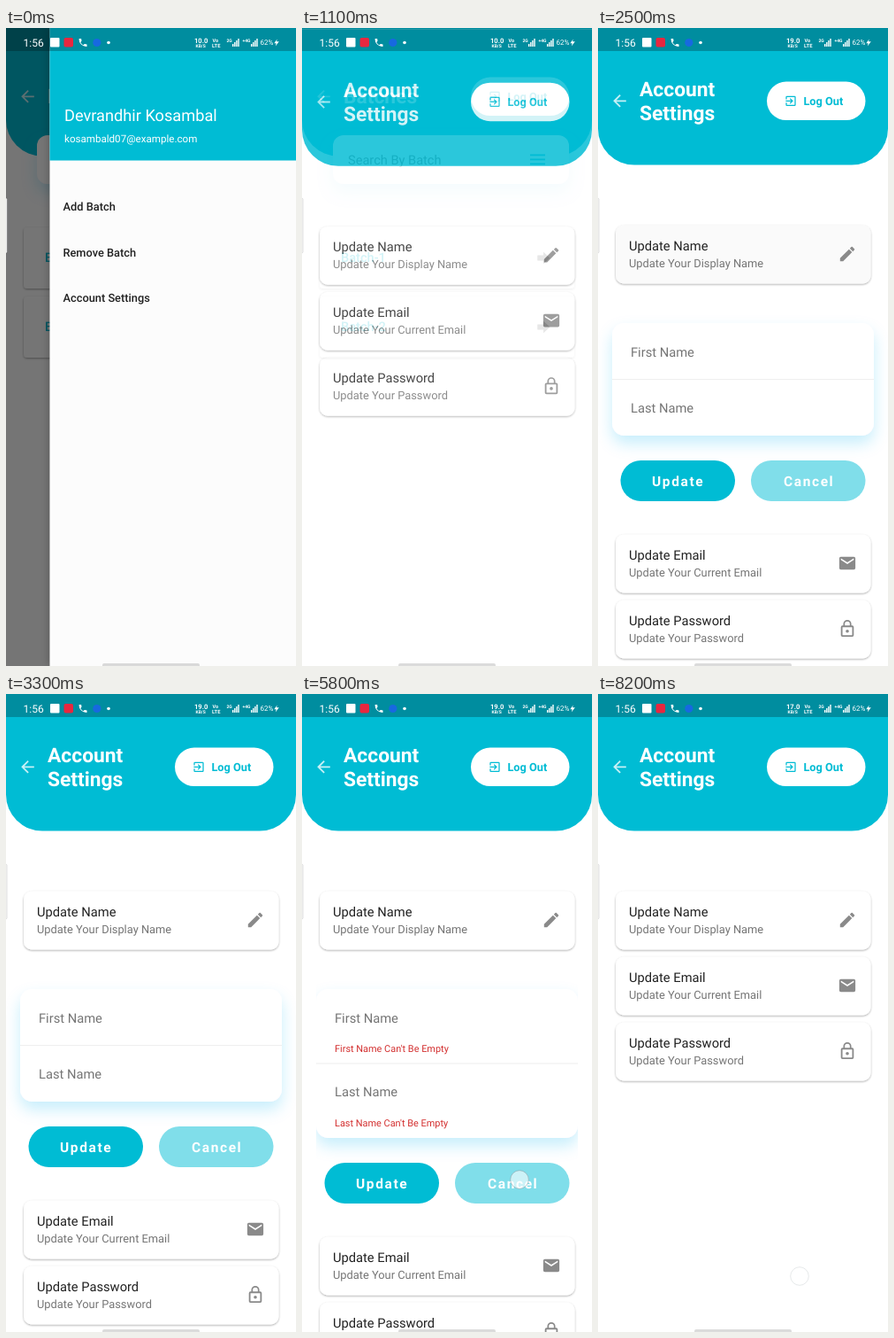
Recreate the animation shown at these times as an HTML page. Size 328 px wide and 720 px high, loop 8300 ms.

```html
<!DOCTYPE html>
<html lang="en">
<head>
<meta charset="utf-8">
<title>Account settings</title>
<style>
html, body { margin: 0; width: 100%; height: 100%; overflow: hidden; background: #fff; }
svg { display: block; width: 100%; height: 100%; font-family: Roboto, sans-serif; text-rendering: geometricPrecision; }
text { white-space: pre; }
</style>
</head>
<body>
<svg id="stage" viewBox="0 0 328 720"></svg>
<script>
const LOOP = 8300, CYAN = '#00bcd4', DARK = '#212121', GREY = '#757575';
const CARD_Y = 222.5, CARD_H = 66, PITCH = 74, FORM_H = 275, ERR_H = 20.5;

const ICONS = {
  back: 'M20 11H7.83l5.59-5.59L12 4l-8 8 8 8 1.41-1.41L7.83 13H20z',
  exit: 'M10.1 15.6L11.5 17l5-5-5-5-1.4 1.4L12.7 11H3v2h9.7zM19 3H5a2 2 0 0 0-2 2v4h2V5h14v14H5v-4H3v4a2 2 0 0 0 2 2h14a2 2 0 0 0 2-2V5a2 2 0 0 0-2-2z',
  edit: 'M3 17.25V21h3.75L17.8 9.94l-3.75-3.75zM20.7 7.04a1 1 0 0 0 0-1.41l-2.34-2.34a1 1 0 0 0-1.41 0l-1.83 1.83 3.75 3.75z',
  mail: 'M20 4H4a2 2 0 0 0-2 2v12a2 2 0 0 0 2 2h16a2 2 0 0 0 2-2V6a2 2 0 0 0-2-2zm0 4l-8 5-8-5V6l8 5 8-5z',
  lock: 'M12 17a2 2 0 0 0 0-4 2 2 0 0 0 0 4zm6-9h-1V6A5 5 0 0 0 7 6v2H6a2 2 0 0 0-2 2v10a2 2 0 0 0 2 2h12a2 2 0 0 0 2-2V10a2 2 0 0 0-2-2zM8.9 6a3.1 3.1 0 0 1 6.2 0v2H8.9zM18 20H6V10h12z',
  phone: 'M6.6 10.8c1.4 2.8 3.8 5.1 6.6 6.6l2.2-2.2c.3-.3.7-.4 1-.2 1.1.4 2.3.6 3.6.6a1 1 0 0 1 1 1V20a1 1 0 0 1-1 1A17 17 0 0 1 3 4a1 1 0 0 1 1-1h3.5a1 1 0 0 1 1 1c0 1.3.2 2.5.6 3.6.1.4 0 .7-.3 1z',
  arrow: 'M3 8h9V3l10 9-10 9v-5H3z',
  bolt: 'M14 2L5 14h6l-2 8 10-13h-7z'
};

// y is the middle of the capitals
const text = (x, y, size, str, fill, weight = 400, attrs = '') =>
  `<text x="${x}" y="${y + size * .355}" font-size="${size}" font-weight="${weight}" fill="${fill}" ${attrs}>${str}</text>`;
const rect = (x, y, w, h, r, fill, attrs = '') =>
  `<rect x="${x}" y="${y}" width="${w}" height="${h}" rx="${r}" fill="${fill}" ${attrs}/>`;
const icon = (name, cx, cy, size, fill) =>
  `<path d="${ICONS[name]}" fill="${fill}" fill-rule="evenodd" transform="translate(${cx - size / 2} ${cy - size / 2}) scale(${size / 24})"/>`;

function header(bottom, lines) {
  const r = 41, mid = bottom / 2 + 5;
  const top = mid - (lines.length - 1) * 13.5;
  return `<path d="M0 0H328V${bottom - r}a${r} ${r} 0 0 1-${r} ${r}H${r}a${r} ${r} 0 0 1-${r}-${r}z" fill="${CYAN}"/>` +
    icon('back', 24.5, mid, 21.9, 'rgba(255,255,255,.78)') +
    lines.map((s, i) => text(47, top + i * 27, 22.8, s, '#fff', 700)).join('') +
    rect(191, mid - 21.8, 111.5, 43.6, 21.8, '#fff') +
    icon('exit', 218, mid, 15, CYAN) + text(232.4, mid, 12.75, 'Log Out', CYAN, 700);
}

const batch = (y, name) =>
  rect(20, y, 288, 69, 4, '#fff', 'filter="url(#lift)"') +
  text(44, y + 34.2, 14.6, name, CYAN, 500) + icon('arrow', 273, y + 34.5, 18, '#757575');

function batchesPage() {
  const bars = [142.5, 147.5, 152.5].map(y => rect(258, y, 17, 1.8, 0, CYAN)).join('');
  return rect(0, 0, 328, 720, 0, '#fff') + header(144.6, ['Batches']) +
    rect(35, 121, 267, 55, 12, '#fff', 'filter="url(#glow)"') +
    text(52, 148.5, 14.6, 'Search By Batch', GREY) + bars +
    batch(225, 'Batch-1') + batch(303, 'Batch-2');
}

function drawer() {
  const items = ['Add Batch', 'Remove Batch', 'Account Settings'];
  return rect(49.5, 0, 279, 720, 0, '#fcfcfc', 'filter="url(#edge)"') + rect(49.5, 0, 279, 149.5, 0, CYAN) +
    text(66, 99, 18.2, 'Devrandhir Kosambal', '#fff') +
    text(66, 124.5, 11.6, 'kosambald07@example.com', '#fff') +
    rect(49.5, 279, 279, 52, 0, '#000', 'id="tile" opacity="0"') +
    items.map((s, i) => text(64.5, 201.3 + i * 51.8, 12.8, s, DARK, 500)).join('');
}

const card = (i, title, sub, glyph) => {
  const y = CARD_Y + i * PITCH;
  return `<g id="card${i}">` + rect(20, y, 288.5, CARD_H, 9, '#fff', 'filter="url(#lift)"') +
    rect(20, y, 288.5, CARD_H, 9, '#000', `id="press${i}" opacity="0"`) +
    text(35, y + 23.6, 14.7, title, DARK) + text(35, y + 42.6, 12.85, sub, GREY) +
    icon(glyph, 282, y + 32.5, 21.9, '#8a8a8a') + '</g>';
};

function form(id, top, labels, errors) {
  const button = (x, tx, s, fill) => rect(x, top + 199.5, 129.5, 46, 23, fill) +
    text(tx, top + 222.7, 15.5, s, '#fff', 700, 'letter-spacing="1.6"');
  const fail = i => errors ? text(37, top + 112 + i * 84, 10.93, errors[i], '#d32f2f', 400, `id="err${i}"`) : '';
  return `<clipPath id="${id}Clip"><rect id="${id}Box" y="${top}"/></clipPath>
    <g clip-path="url(#${id}Clip)"><g id="${id}Form">` +
    rect(16, top + 44.5, 296, 127, 14, '#fff', `id="${id}Panel" filter="url(#glow)"`) +
    text(37, top + 76.8, 14.7, labels[0], GREY) + fail(0) +
    `<g id="${id}Second">` + rect(16, top + 107.5, 296, 1, 0, '#eee') +
    text(37, top + 140, 14.7, labels[1], GREY) + '</g>' + fail(1) +
    `<g id="${id}Buttons">` + button(25.5, 61, 'Update', CYAN) + button(173, 210, 'Cancel', '#80deea') + '</g></g></g>';
}

const settingsPage = () => rect(0, 0, 328, 720, 0, '#fff') + header(154.6, ['Account', 'Settings']) +
  form('name', 288.5, ['First Name', 'Last Name'], ["First Name Can't Be Empty", "Last Name Can't Be Empty"]) +
  form('pass', 436.5, ['New Password', 'Confirm Password']) +
  card(0, 'Update Name', 'Update Your Display Name', 'edit') +
  card(1, 'Update Email', 'Update Your Current Email', 'mail') +
  card(2, 'Update Password', 'Update Your Password', 'lock');

function statusBar() {
  const bars = x => [3, 5, 7, 9].map((h, i) => rect(x + i * 2.1, 21 - h, 1.4, h, 0, '#fff')).join('');
  const tiny = (x, y, s, size = 5) => text(x, y, size, s, '#fff', 700);
  return rect(0, 0, 328, 26, 0, 'rgba(0,0,0,.25)') + text(19.5, 16.5, 12, '1:56', '#fff') +
    rect(50, 11, 10.5, 10.5, 1, '#fff') + rect(65.5, 11, 10.5, 10.5, 2, '#e8273f') +
    icon('phone', 87, 16.5, 12, '#fff') + '<circle cx="102.8" cy="16.5" r="4.6" fill="#1769e0"/>' +
    '<circle cx="116" cy="16.5" r="1.8" fill="#fff"/>' +
    text(213, 14, 7.6, '10.0', '#fff', 700, 'id="speed"') + tiny(214.5, 20.5, 'KB/S') +
    tiny(233.5, 14, 'Vo', 5.5) + tiny(233, 20, 'LTE', 5.8) +
    tiny(249.5, 14, '2G') + bars(256) + tiny(267.5, 14, '+4G') + bars(277) +
    text(287.5, 16.5, 8, '62%', '#fff') + icon('bolt', 306, 16.5, 9.5, '#fff');
}

const shadow = (id, dy, dev, color, alpha) =>
  `<filter id="${id}" x="-20%" y="-50%" width="140%" height="200%"><feDropShadow dx="0" dy="${dy}" stdDeviation="${dev}" flood-color="${color}" flood-opacity="${alpha}"/></filter>`;

const stage = document.getElementById('stage');
stage.innerHTML = '<defs>' + shadow('lift', 1, 1, '#000', .34) +
  shadow('glow', 9, 8.5, '#03b4f0', .22) + shadow('edge', 0, 5, '#000', .3) + '</defs>' +
  batchesPage() + rect(0, 0, 328, 720, 0, '#000', 'id="scrim"') +
  `<g id="drawer">${drawer()}</g><g id="page">${settingsPage()}</g>` + statusBar() +
  rect(-2, 192, 3.2, 62, 1.6, '#f0f0f0', 'stroke="rgba(0,0,0,.14)" stroke-width=".6"') +
  rect(109, 717, 110, 5, 2, 'rgba(0,0,0,.14)') +
  '<circle id="touch" r="10.3" fill="#fff" fill-opacity=".6" stroke="#8e9aa0" stroke-opacity=".5" stroke-width="1"/>';

const el = {};
stage.querySelectorAll('[id]').forEach(n => el[n.id] = n);
const set = (id, attrs) => { for (const k in attrs) el[id].setAttribute(k, attrs[k]); };
const moveTo = (id, x, y) => set(id, { transform: `translate(${x} ${y})` });

const ramp = (t, a, b) => Math.min(1, Math.max(0, (t - a) / (b - a)));
function bezier(x1, y1, x2, y2) {
  const at = (s, a, b) => 3 * (1 - s) * (1 - s) * s * a + 3 * (1 - s) * s * s * b + s * s * s;
  return x => {
    if (x <= 0 || x >= 1) return x;
    let lo = 0, hi = 1;
    for (let i = 0; i < 24; i++) {
      const m = (lo + hi) / 2;
      if (at(m, x1, x2) < x) lo = m; else hi = m;
    }
    return at(lo, y1, y2);
  };
}
const fastOut = bezier(.4, 0, .2, 1), easeIn = bezier(.42, 0, 1, 1);
const ease = (t, a, b) => fastOut(ramp(t, a, b));
const pulse = (t, a, b, c, d) => ramp(t, a, b) - ramp(t, c, d);

// x, y, finger down, finger up
const TOUCHES = [
  [181, 310, 650, 740], [196, 257, 1850, 1960], [92.5, 514, 3650, 3780],
  [246, 548, 5450, 5850], [200, 404, 6250, 6350], [228, 657, 7950, 8060]
];

function drawForm(id, open, extra, clipped) {
  const tight = clipped || open < 1;
  set(id + 'Box', { x: tight ? 16 : 0, width: tight ? 296 : 328, height: open * (FORM_H + 2 * extra) });
  set(id + 'Form', { opacity: open });
  set(id + 'Panel', { height: 127 + 2 * extra });
  moveTo(id + 'Second', 0, extra);
  moveTo(id + 'Buttons', 0, 2 * extra);
}

function render(t) {
  const shut = 1 - (1 - ramp(t, 900, 1074)) ** 2;
  const push = ramp(t, 900, 1125);
  moveTo('drawer', 278 * shut, 0);
  set('drawer', { visibility: shut < 1 ? 'visible' : 'hidden' });
  set('scrim', { opacity: .54 * (1 - shut) });
  set('tile', { opacity: .03 * pulse(t, 680, 800, 950, 1150) });
  moveTo('page', 0, 180 * (1 - fastOut(push)));
  set('page', { opacity: easeIn(push) });

  const name = ease(t, 1980, 2300) - ease(t, 5880, 6080);
  const pass = ease(t, 6380, 6700) - ease(t, 8050, 8190);
  const extra = t < 6100 ? ERR_H * ease(t, 3750, 3890) : 0;
  const shown = ramp(t, 3820, 4000);
  drawForm('name', name, extra, t > 3700);
  drawForm('pass', pass, 0, false);
  [0, 1].forEach(i => {
    set('err' + i, { opacity: shown });
    moveTo('err' + i, 0, -2.7 * (1 - shown));
  });
  const drop = name * (FORM_H + 2 * extra);
  moveTo('card1', 0, drop);
  moveTo('card2', 0, drop);
  set('press0', { opacity: .03 * pulse(t, 1880, 2000, 2450, 2600) });
  set('press2', { opacity: .03 * pulse(t, 6280, 6400, 6900, 7100) });

  const hit = TOUCHES.find(([, , a, b]) => t >= a && t < b + 250);
  set('touch', hit
    ? { cx: hit[0], cy: hit[1], opacity: pulse(t, hit[2], hit[2] + 40, hit[3], hit[3] + 250) }
    : { opacity: 0 });
  el.speed.textContent = t < 1900 ? '10.0' : t < 6500 ? '19.0' : '17.0';
}

const start = performance.now();
function tick() {
  render((performance.now() - start) % LOOP);
  requestAnimationFrame(tick);
}
tick();
</script>
</body>
</html>
```
